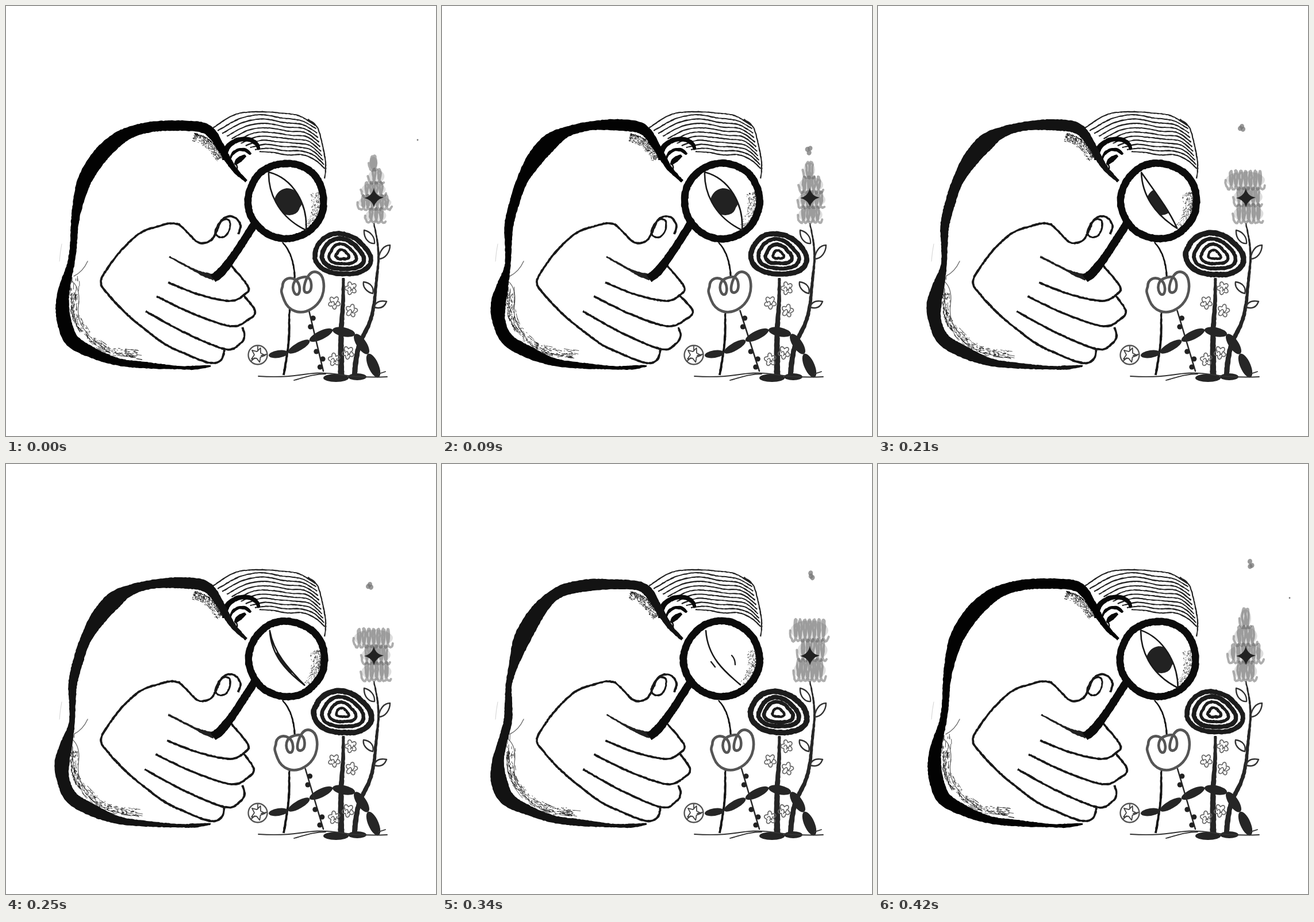
An HTML page that plays this animation: 748x748 px, repeating every 460 ms.

```html
<!DOCTYPE html>
<html lang="en">
<head>
<meta charset="utf-8">
<title>Looking closely</title>
<style>
html, body { margin: 0; width: 100%; height: 100%; overflow: hidden; background: #fff; }
svg { display: block; width: 100vw; height: 100vh; }
</style>
</head>
<body>
<svg id="stage" viewBox="0 0 748 748" fill="none" stroke-linecap="round" stroke-linejoin="round"></svg>
<script>
const LOOP = 460, STEPS = 11, POSES = 5;
const startOf = k => k * 40 + (k > 1 ? 10 : 0) + (k > 7 ? 10 : 0);

// ---- drawing helpers ----
let seed = 7;
const rnd = () => (seed = seed * 16807 % 2147483647) / 2147483647;
const jit = a => (rnd() * 2 - 1) * a;
const lerp = (a, b, t) => a + (b - a) * t;
const mix = (p, q, t) => p.map((v, i) => lerp(v, q[i], t));
const range = n => [...Array(n).keys()];
const points = s => s.trim().split(/\s*,\s*/).map(p => p.split(' ').map(Number));

// Catmull-Rom spline sampled about every 3 px; a third value is the width
function curve(s, closed) {
  const p = typeof s === 'string' ? points(s) : s, n = p.length, out = [];
  const at = i => closed ? p[(i + n) % n] : p[Math.max(0, Math.min(n - 1, i))];
  for (let i = 0; i < (closed ? n : n - 1); i++) {
    const [a, b, c, d] = [at(i - 1), at(i), at(i + 1), at(i + 2)];
    const k = Math.max(1, Math.ceil(Math.hypot(c[0] - b[0], c[1] - b[1]) / 3));
    for (let j = 0; j < k; j++) {
      const t = j / k;
      out.push(b.map((v, q) => .5 * (2 * v + (c[q] - a[q]) * t +
        (2 * a[q] - 5 * v + 4 * c[q] - d[q]) * t * t + (3 * v - a[q] - 3 * c[q] + d[q]) * t * t * t)));
    }
  }
  if (!closed) out.push(p[n - 1]);
  return out;
}

const poly = p => 'M' + p.map(q => q[0].toFixed(1) + ' ' + q[1].toFixed(1)).join('L') + 'Z';
const fill = (d, c) => `<path d="${d}" fill="${c}" fill-rule="evenodd"/>`;
const line = (d, w, c = '#111', o = 1) => `<path d="${d}" stroke="${c}" stroke-width="${w}" opacity="${o}"/>`;
const oval = (x, y, rx, ry, a = 0, c = '#262626', o = 1) =>
  `<ellipse cx="${x}" cy="${y}" rx="${rx}" ry="${ry}" transform="rotate(${a} ${x} ${y})" fill="${c}" opacity="${o}"/>`;

function normals(p, closed) {
  const n = p.length;
  return p.map((q, i) => {
    const a = closed ? p[(i + n - 1) % n] : p[Math.max(0, i - 1)];
    const b = closed ? p[(i + 1) % n] : p[Math.min(n - 1, i + 1)];
    const dx = b[0] - a[0], dy = b[1] - a[1], l = Math.hypot(dx, dy) || 1;
    return [dy / l, -dx / l];
  });
}

// rough brush line, w px wide unless its points carry widths
function ink(s, w = 2, c = '#111', j = .35, closed = false) {
  const p = curve(s, closed), nv = normals(p, closed);
  const side = k => p.map((q, i) => {
    const h = k * ((q[2] ?? w) / 2 + jit(j));
    return [q[0] + nv[i][0] * h, q[1] + nv[i][1] * h];
  });
  const a = side(1), b = side(-1).reverse();
  return fill(closed ? poly(a) + poly(b) : poly(a.concat(b)), c);
}

// pencil grain falling off to one side of a curve
function grain(s, depth, count, len, o = .8) {
  const p = curve(s), nv = normals(p);
  let d = '';
  for (let i = 0; i < count; i++) {
    const k = Math.floor(rnd() * p.length), r = depth * Math.pow(rnd(), 2), l = len * (.3 + rnd());
    d += `M${(p[k][0] + nv[k][0] * r + jit(1)).toFixed(1)} ${(p[k][1] + nv[k][1] * r + jit(1)).toFixed(1)}` +
      `l${(-nv[k][1] * l + jit(.5)).toFixed(1)} ${(nv[k][0] * l + jit(.5)).toFixed(1)}`;
  }
  return line(d, 1, '#111', o);
}

// ---- head ----
function drawMan() {
  const top = points('360 212,398 189,437 184,475 186,510 191,538 208');
  const low = points('441 254,465 256,490 257,515 260,537 268,555 281');
  const hair = range(11).map(i => ink(top.map((p, k) => {
    const [x, y] = mix(p, low[k], i / 10);
    return [x, y + (i ? 2.2 * Math.sin(k * 2.2 + i * .35) : 0)];
  }), 2.1, '#222'));
  return hair.join('') +
    ink('525 197,541 210,549 235,555 265,556 285,554 300', 2.2, '#222') +
    ink('381 268 10,382 252 10,392 239 9,408 232 8,425 233 8,436 240 7,440 250 5', 9, '#080808') +
    ink('390 266 3,395 256 5,405 250 5,417 251 6,426 258 4', 5, '#080808') +
    ink('417 260 4,409 265 9,403 270 9,398 276 4', 6, '#080808') +
    line('M399 274Q403 278 402 283', 2.4) +
    ink('481 411 2.4,491 425 2.8,498 443 3,502 470 3,497 505 3,493 535 3.4,492 580 4,488 612 4,483 642 4', 3, '#151515');
}

// ---- body, hand and glass: one drawing, redrawn with a seeded wobble ----
const back = points(`418 305 5,398 285 9,384 264 12,372 243 14,358 222 17,340 211 18,300 208 18,255 210 18,
  218 219 20,190 235 25,160 265 27,136 305 24,124 350 17,119 385 13,117 420 12,112 452 13,102 488 19,98 520 23,
  102 552 25,115 582 24,150 603 19,195 619 13,245 625 11,300 629 6,330 629 7,356 626 3`);
const loose = (i, a) => i ? jit(a) : 0;

function finger(from, knuckle, tip, end) {
  const mid = mix(from, knuckle, .5), bend = mix(knuckle, tip, .6);
  return ink([from, [mid[0], mid[1] + 5], knuckle, [bend[0] + 6, bend[1] + 4], tip, end], 3.7, '#191919', .5);
}

function drawRose(i) {
  return range(4).map(n => {
    const k = .93 - n * .24 + loose(i, .03), p = range(18).map(m => {
      const a = m * Math.PI / 9, r = k * (1 + (.05 + n * .03) * Math.cos(3 * a - 1.2)) + jit(.012);
      return [585 + 52 * r * Math.cos(a), 433 + 38 * r * Math.sin(a + .12)];
    });
    return ink(p, 9 - n * 1.5 + jit(.8), '#1c1c1c', .5, true);
  }).join('');
}

function drawPose(i) {
  seed = 101 + i * 977;
  const ph = rnd() * 6, ph2 = rnd() * 6, last = back.length - 1;
  const body = back.map(([x, y, w], k) => {
    const e = i && k > 4 ? Math.sin(Math.PI * k / last) : 0;
    return [x + e * 3 * Math.sin(k * 1.3 + ph), y + e * 2 * Math.sin(k + ph2), w * (1 + e * .2 * Math.sin(k * 1.7 + ph2))];
  });
  const cx = 487 + loose(i, 1), cy = 339, r = 65.8;
  const ring = range(16).map(k => [cx + Math.cos(k * Math.PI / 8) * (r + jit(1)), cy + Math.sin(k * Math.PI / 8) * (r + jit(1))]);
  const dx = loose(i, 3), tx = loose(i, 3);
  return grain('378 262,364 242,348 229,330 222', 14, 480, 1.2) +
    grain('112 470,112 520,120 552,140 580,175 604,228 613', 15, 90, 9, .7) +
    grain('113 500,117 545,140 575,172 600,225 611', 11, 300, 2.4) +
    line('M114 478Q130 490 126 520T144 572M118 470Q134 462 142 444', 1.4, '#333', .7) +
    line('M97 414Q94 428 93 444', 1, '#999', .45) +
    ink(body, 9, i < 3 ? '#030303' : '#131313', .45) +
    ink('301 380,286 378,266 383,235 394,205 420,181 450,165 480,179 503,208 534,240 561,278 589,312 605,344 618,364 621,376 613,380 598', 3.8, '#191919', .5) +
    ink('300 379,313 391,332 410,347 412,359 405,368 388,375 373,387 366,400 369,408 382,404 397', 3.7, '#191919', .5) +
    ink('364 394,370 379,380 371,389 374,389 388,382 400,371 402', 3.2, '#191919', .5, true) +
    finger([282 + dx, 481], [390, 513], [421, 488], [392, 452]) +
    finger([262 + dx, 505], [392, 557], [433 + tx, 530], [412, 502]) +
    finger([243 + dx, 531], [382, 597], [415, 573], [411, 559]) +
    ink(`${284 + dx} 436 ${2 + rnd() * 2},325 458 4,345 467 8,362 472 11`, 4, '#222', .5) +
    fill(poly(curve(ring, true)), '#fff') +
    grain('535 388,546 366,549 345,546 325', 17, 330, 1.3, .65) +
    ink(ring, 12.6, '#0c0c0c', .5, true) +
    ink('433 378 14,398 432 14,375 462 16,360 474 15', 14, '#0c0c0c', .4) +
    drawRose(i) + (i ? '' : oval(716, 233, 1.4, 1.4, 0, '#777'));
}

// ---- plants ----
function cloud(x, y, ph) {
  const p = range(32).map(k => {
    const a = k * .2, r = 5.5 + 5 * Math.abs(Math.sin(a * 2.5 + ph));
    return [x + r * Math.cos(a), y + r * 1.1 * Math.sin(a)];
  });
  return line(poly(p) + `M${x - 5} ${y}q4 -5 5 1t5 -3M${x - 1} ${y + 5}q2 -5 4 -1`, 1.7, '#666');
}

function drawPlants() {
  seed = 55;
  const joints = points('457 608,491 603,528 582,568 563,607 571,630 605,648 646');
  const beads = joints.slice(1).map(([x, y], i) => {
    const [a, b] = joints[i], l = Math.hypot(x - a, y - b);
    return oval((x + a) / 2, (y + b) / 2, l / 2, 6.5 + i * .5, Math.atan2(y - b, x - a) * 180 / Math.PI);
  });
  const star = range(10).map(k => {
    const a = k * Math.PI / 5 - 1.2, r = k % 2 ? 6 : 13;
    return [438 + r * Math.cos(a), 607 + r * Math.sin(a)];
  });
  return ink('587 473 5,586 520 7,583 570 9,583 644 11', 7, '#262626') +
    ink('640 378 2.6,646 410 3,648 440 4,644 480 5,640 520 6,632 552 7,616 585 8,609 615 9,606 645 9', 5, '#262626') +
    line('M641 413C632 414 622 405 623 390C634 392 642 402 641 413M648 440C650 425 658 416 668 416C668 428 660 440 648 440M638 500C628 498 620 489 622 480C634 481 641 490 638 500M640 524C643 514 652 512 662 514C658 525 650 527 640 524', 2.4, '#333') +
    beads.join('') + oval(574, 647, 22, 7) + oval(611, 645, 16, 6) +
    line('M439 644C470 646 490 645 510 642S550 636 580 641S640 646 663 645M501 651C520 646 535 640 556 640M648 640L660 636', 1.8, '#333') +
    `<circle cx="438" cy="607" r="16.5" stroke="#555" stroke-width="2.4"/>` + line(poly(star) + 'M438 600V592M444 608L453 606M433 612L426 618', 1.8, '#444') +
    points('600 491,571 516,601 530,571 615,595 603').map(([x, y], i) => cloud(x, y, i * .9)).join('');
}

// tall flower: stacked rows of pencil loops, given by the top edge and the row widths
const spires = [[262, 7, 22, 36, 52, 30], [272, 14, 36, 42, 36], [276, 16, 38, 40, 36], [288, 62, 44, 46], [272, 60, 46, 50], [253, 14, 34, 56, 34]];

function drawSpire([top, ...widths], i) {
  seed = 31 + i * 53;
  const h = (376 - top) / widths.length;
  const rows = widths.map((w, k) => {
    const y = top + h * (k + .5), x = 642 + jit(3), n = Math.max(2, Math.round(w / 9)), p = [];
    for (let t = 0; t <= 1; t += .05 / n) {
      const g = t * (n + .4) * 2 * Math.PI;
      p.push([x + (t - .5) * w - 4 * Math.cos(g) + jit(.7), y + h * .55 * Math.sin(g) + jit(.7)]);
    }
    return oval(x, y, w / 2 + 3, h / 2, 0, '#888', .28) + line(poly(p).slice(0, -1), 4, '#5c5c5c', .5);
  });
  const sx = 639 + 11 * Math.cos((i - 5) * 1.16), sy = 268 - 18.5 * i;
  const spark = i ? range(3).map(() => oval(sx + jit(4), sy + jit(6), 4, 4.5, 20, '#777', .75)).join('') : '';
  return rows.join('') + spark +
    fill('M640 316Q642 331 657 333Q643 337 640 350Q637 337 623 334Q637 331 640 316Z', '#222');
}

// ---- scene ----
const tulip = 'M470 488C470 475 482 470 492 476S502 502 495 502S483 480 498 474S519 472 520 484S515 500 510 498S508 478 516 468S538 462 541 478S540 515 520 527S480 530 473 512S468 495 470 488Z';
const stage = document.getElementById('stage');
const layers = (name, list, fn) => list.map((p, i) => `<g class="${name}">${fn(p, i)}</g>`).join('');
stage.innerHTML = '<clipPath id="lids"><path id="lidClip"/></clipPath>' + drawMan() +
  layers('pose', range(POSES), drawPose) +
  `<g clip-path="url(#lids)"><path d="M488 317Q505 317 510 333L516 343L511 351Q508 363 493 364Q468 362 466 340Q470 320 488 317Z" fill="#222"/></g>
   <path id="lid" stroke="#1a1a1a" stroke-width="2.6"/>
   <path id="ticks" d="M504 333Q510 339 510 349M468 344L475 353" stroke="#222" stroke-width="2.4"/>` +
  drawPlants() + layers('spire', spires, drawSpire) +
  `<path id="sprig" stroke="#2a2a2a" stroke-width="2.6"/><g id="buds"></g>
   <path id="tulip" d="${tulip}" fill="#fff" stroke="#555" stroke-width="4.6"/>`;
const $ = id => document.getElementById(id);
const poseEls = [...document.querySelectorAll('.pose')], spireEls = [...document.querySelectorAll('.spire')];
const show = (els, k) => els.forEach((e, i) => e.style.display = i === k ? '' : 'none');

// blink: speeds up while closing, slows down while opening
function openness(t) {
  if (t < 290) return Math.min(1, (290 - t) / 120) ** 2;
  return Math.sin(Math.max(0, t - 340) / 110 * Math.PI / 2);
}

function eyePath(o) {
  const m = (x0, y0, x1, y1) => mix([x0, y0], [x1, y1], o).map(v => v.toFixed(1)).join(' ');
  const a = m(459, 290, 457, 289), b = m(519, 384, 522, 390);
  return `M${a}C${m(462, 335, 456, 320)} ${m(490, 360, 470, 365)} ${b}C${m(490, 360, 525, 345)} ${m(462, 335, 500, 300)} ${a}Z`;
}

let last = -1;
function draw(time) {
  const t = time % LOOP;
  let k = STEPS - 1;
  while (t < startOf(k)) k--;
  if (k === last) return;
  last = k;
  const pair = Math.floor((k + 1) / 2);
  show(poseEls, pair % POSES);
  show(spireEls, pair);
  const open = openness(startOf(k)), lid = eyePath(open);
  $('lid').setAttribute('d', lid);
  $('lidClip').setAttribute('d', lid);
  $('ticks').style.display = open ? 'none' : '';
  const sway = 11 * Math.exp(-.42 * k) * Math.cos(1.7 * k), x = 521 + sway * .55;
  $('tulip').setAttribute('transform', `translate(${sway.toFixed(2)} 0)`);
  $('sprig').setAttribute('d', `M${x} 530L552 635`);
  $('buds').innerHTML = [543, -558, -601, 614, -628].map(v => {
    const y = Math.abs(v);
    return oval(lerp(x, 552, (y - 530) / 105) + 4 * Math.sign(v), y, 4.6, 4.6, 0, '#222');
  }).join('');
}
function tick(now) {
  draw(now);
  requestAnimationFrame(tick);
}
draw(0);
requestAnimationFrame(tick);
</script>
</body>
</html>
```
